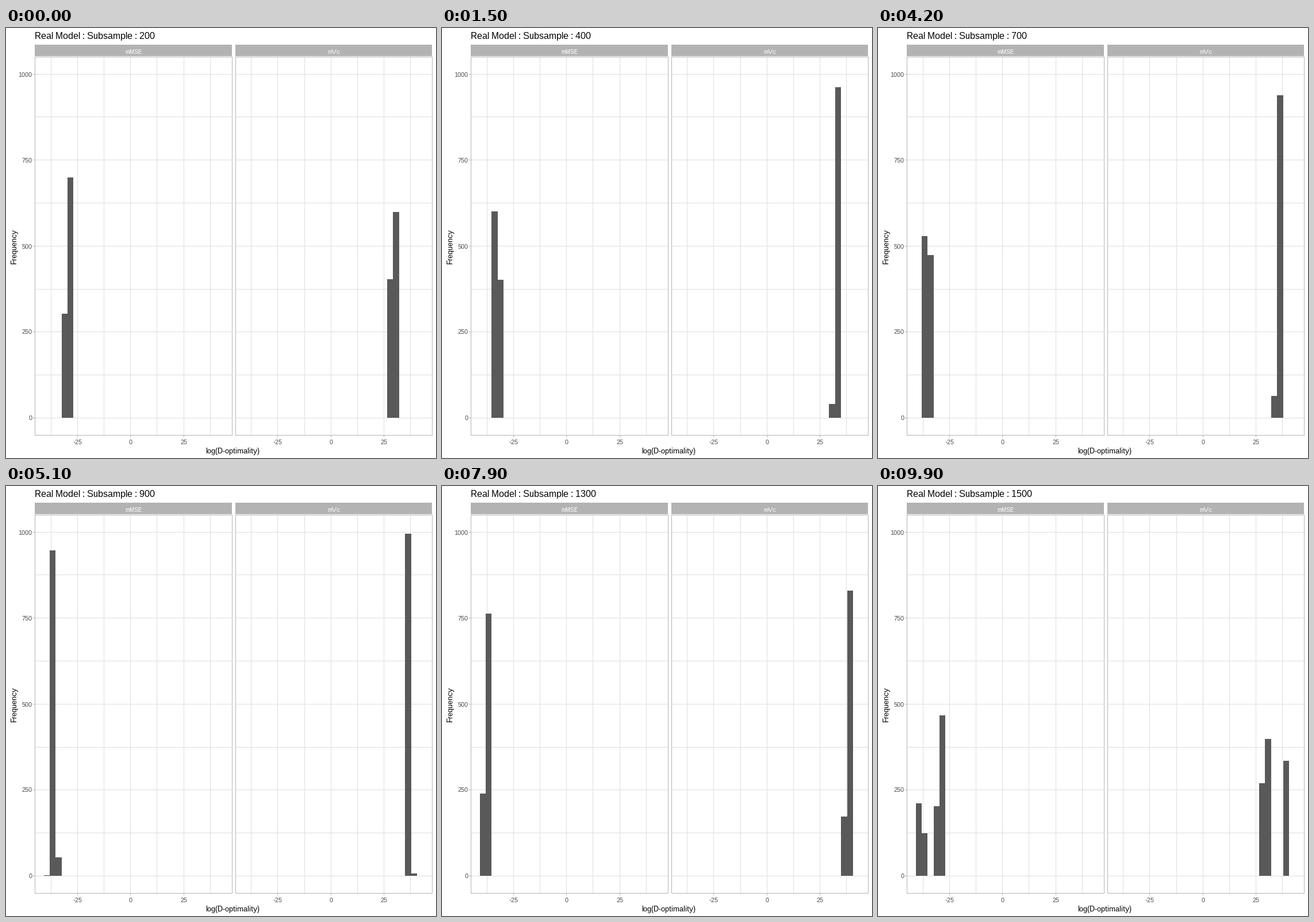
These frames come from a looping animation (748x748 px, 10 s). A matplotlib script:

```python
import math

import numpy as np
import matplotlib.pyplot as plt
from matplotlib.animation import FuncAnimation
from matplotlib.patches import Rectangle

SIZE, DPI = 748, 100
BASE, STEP_Y = 678, 74.8     # y of zero, pixels per 125 counts
UNIT = STEP_Y / 125          # pixels per count
STEP_X, BIN_W = 46.15, 10.38  # pixels per 12.5 units, per histogram bin
GREY, GRID, BAR, LABEL = "#b3b3b3", "#dedede", "#595959", "#4d4d4d"

plt.rcParams.update({"font.family": "Liberation Sans",
                     "text.hinting": "default", "text.hinting_factor": 1})

SAMPLES = range(200, 1501, 100)
STEPS = [4] * 3 + [3] * 11                # frames in each transition
ARRIVE = np.cumsum([4 + n for n in STEPS]) - 1   # frame that ends it

# Mean of the distribution, in bins from the innermost edge.
KEYS = [200, 300, 400, 600, 900, 1100, 1300, 1500]
MMSE = [0.886, 1.58, 2.055, 2.697, 3.356, 3.622, 3.843, 4.074]
MVC = [1.037, 1.843, 2.263, 2.932, 3.632, 3.854, 4.142, 4.5]


def histogram(n, means, sigma):
    """Counts of 1000 normal draws in the five bins next to each other."""
    mean = np.interp(math.log(n), np.log(KEYS), means)
    cdf = [0.5 + 0.5 * math.erf((k - mean) / sigma / math.sqrt(2))
           for k in range(6)]
    return np.round(1000 * np.diff(cdf))


fig = plt.figure(figsize=(SIZE / DPI, SIZE / DPI), dpi=DPI, facecolor="white")
ax = fig.add_axes([0, 0, 1, 1])
ax.set_xlim(0, SIZE)
ax.set_ylim(SIZE, 0)
ax.axis("off")


def box(x, y, w, h, color, z=1):
    return ax.add_patch(Rectangle((x, y), w, h, fc=color, lw=0,
                                  antialiased=False, zorder=z))


def label(x, y, text, px, color="black", ha="center", **kw):
    return ax.text(x, y, text, fontsize=px * 72 / DPI, color=color, ha=ha,
                   va="baseline", zorder=5, **kw)


def panel(name, left, right, zero, side):
    """Draw one facet and return its bars, from the centre outward."""
    width = right - left + 1
    for i in range(9):
        box(left, round(BASE - i * STEP_Y), width, 1, GRID)
    for i in range(-3, 4):
        x = round(zero + i * STEP_X)
        box(x, 50, 1, 659, GRID)
        if i % 2 == 0:
            box(x, 709, 1, 3, GREY)
            label(x + 0.5, 724, str(i * 25 // 2), 11, LABEL)
    for y in (50, 708):
        box(left, y, width, 1, GREY, 3)
    for x in (left, right):
        box(x, 50, 1, 659, GREY, 3)
    box(left, 29, width - 1, 20, GREY, 3)
    label((left + right + 1) / 2, 45, name, 11, "white")

    edges = [round(zero - 0.2 + side * (9.5 + k) * BIN_W) for k in range(6)]
    return [box(min(a, b), BASE, abs(b - a), 0, BAR, 2)
            for a, b in zip(edges, edges[1:])]


facets = [(panel("mMSE", 50, 393, 216.3, -1),
           [histogram(n, MMSE, 0.22) for n in SAMPLES]),
          (panel("mVc", 399, 741, 564.7, 1),
           [histogram(n, MVC, 0.15) for n in SAMPLES])]

for i in range(0, 9, 2):
    y = round(BASE - i * STEP_Y)
    box(47, y, 3, 1, GREY)
    label(45.5, y + 4.5, str(i * 125), 11, LABEL, ha="right")

label(394, 740, "log(D-optimality)", 13)
label(17.5, 379, "Frequency", 13, rotation=90, rotation_mode="anchor")
title = label(50, 19, "", 16, ha="left")


def update(frame):
    now = int(np.searchsorted(ARRIVE, frame, side="right"))
    nxt = (now + 1) % len(SAMPLES)
    step = max(0, frame - (ARRIVE[now] - STEPS[now]))
    t = step / STEPS[now]
    for bars, counts in facets:
        for bar, n in zip(bars, (1 - t) * counts[now] + t * counts[nxt]):
            h = round(n * UNIT + 0.3)
            bar.set_y(BASE - h)
            bar.set_height(h)
            bar.set_visible(h > 0)
    shown = nxt if step >= 3 else now
    title.set_text(f"Real Model : Subsample : {SAMPLES[shown]}")
    return [title]


anim = FuncAnimation(fig, update, frames=100, interval=100, repeat=True,
                     repeat_delay=0, blit=False)
plt.show()
```
